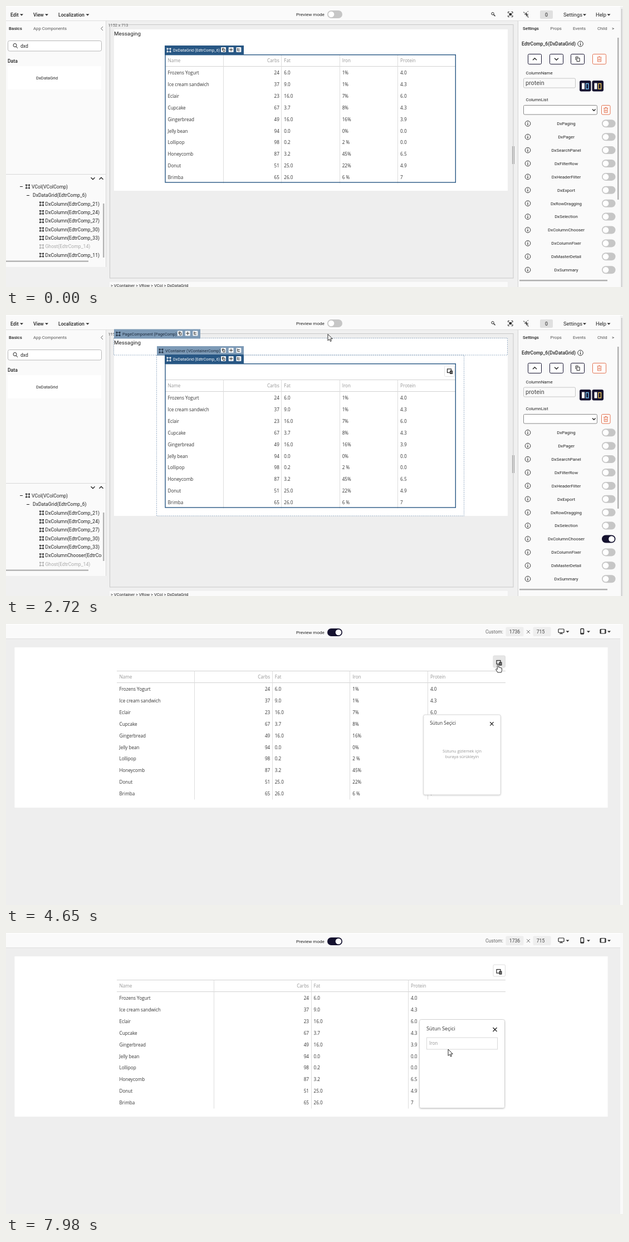
An HTML page for the animation above (8000 ms loop, 1108 by 505 pixels).

```html
<!DOCTYPE html>
<html lang="en">
<head>
<meta charset="utf-8">
<style>
html, body { margin: 0; width: 100%; height: 100%; overflow: hidden; background: #eee }
svg { display: block; width: 1108px; height: 505px; font-family: Roboto, sans-serif; fill: #222 }
.grid { font-family: "Open Sans", sans-serif; fill: #333 }
.mute { fill: #959595 }
.line { fill: none; stroke: #222 }
.bold { font-weight: 500 }
</style>
</head>
<body>
<svg id="stage" viewBox="0 0 1108 505"></svg>
<script>
const NAVY = '#15122f', BLUE = '#285784', PALE = '#7d9ab6', RED = '#e2714f';

// Markup helpers; text is placed by its vertical middle.
const text = (x, y, s, size = 8.7, attrs = '') =>
  `<text x="${x}" y="${y + size * 0.36}" font-size="${size}" ${attrs}>${s}</text>`;
const rect = (x, y, w, h, fill, attrs = '') =>
  `<rect x="${x}" y="${y}" width="${w}" height="${h}" fill="${fill}" ${attrs}/>`;
const path = (d, attrs = '') => `<path class="line" d="${d}" ${attrs}/>`;
const at = (x, y, body) => `<g transform="translate(${x} ${y})">${body}</g>`;
const group = (id, body, attrs = '') => `<g id="${id}" ${attrs}>${body}</g>`;
const MID = 'text-anchor="middle"', END = 'text-anchor="end"', BOLD = 'class="bold"';

const caret = (x, y) => `<path d="M${x - 3} ${y - 1.5}h6l-3 3z"/>`;
const chevron = (x, y, up) => path(`M${x - 3.5} ${y + up * 1.7}l3.5 ${-up * 3.5}l3.5 ${up * 3.5}`, 'stroke-width="1.3"');
const toggle = (id, x, y, w) =>
  rect(x, y - 7, w, 14, '#c6c6c6', `rx="7" id="${id}Track"`) +
  `<circle id="${id}Knob" cx="${x + 7}" cy="${y}" r="5.3" fill="#fff"/>`;
const info = (x, y) => `<circle class="line" cx="${x}" cy="${y}" r="4.8" stroke-width=".9"/>` +
  path(`M${x} ${y - 2.8}v1.2M${x} ${y - .6}v3.4`, 'stroke-width="1.2"');
const nodeIcon = (x, y, color = '#222') => {
  const corner = (dx, dy) => rect(x + dx - 1.1, y + dy - 1.1, 2.2, 2.2, color);
  return rect(x - 2.6, y - 2.6, 5.2, 5.2, 'none', `stroke="${color}" stroke-width=".9"`) +
    corner(-2.8, -2.8) + corner(2.8, -2.8) + corner(-2.8, 2.8) + corner(2.8, 2.8);
};
const copyIcon = (x, y) => at(x, y, path('M-3.4 1.5V-4H1.4M-1.4-1.9H3.6V4.2H-1.4Z'));
const trash = (x, y) => at(x, y,
  path('M-4-3.5H4M-1.3-4.7H1.3M-3-3V4.5H3V-3M-1-1V2.7M1-1V2.7', `style="stroke:${RED}"`));
const chooserIcon = (x, y) =>
  rect(x - 4.5, y - 4, 7, 6.5, 'none', 'stroke="#222" stroke-width="1.2"') +
  rect(x, y - 1, 5, 6, '#222') + path(`M${x + 1} ${y + 1}h3m-3 2h3`, 'style="stroke:#fff" stroke-width=".7"');

// Name tag of a component on the design surface.
function tag(x, y, w, label, solid) {
  const ink = solid ? '#fff' : '#1c2a3c';
  const tools = ['M-2 1V-2.5H1M-.7-1H2.4V3H-.7Z', 'M0-3V3M-3 0H3', 'M-2-3V2H2M-2-1H2'];
  return rect(x, y, w, 17, solid ? BLUE : PALE) + nodeIcon(x + 7.5, y + 8.5, ink) +
    text(x + 15, y + 8.5, label, 7.35, `fill="${ink}"`) +
    tools.map((d, i) => at(x + w - 36.5 + i * 13.7, y + 7.5,
      rect(-4.5, -4.5, 9, 9, '#f2f4f6', 'rx="1"') + path(d, 'stroke-width=".9"'))).join('');
}
const dashed = (x, y, w, h, id = '') =>
  rect(x, y, w, h, 'none', `stroke="${PALE}" stroke-dasharray="2 1.5" stroke-width=".8" id="${id}"`);

const HEADS = ['Name', 'Carbs', 'Fat', 'Iron', 'Protein'];
const ROWS = `Frozens Yogurt,24,6.0,1%,4.0
Ice cream sandwich,37,9.0,1%,4.3
Eclair,23,16.0,7%,6.0
Cupcake,67,3.7,8%,4.3
Gingerbread,49,16.0,16%,3.9
Jelly bean,94,0.0,0%,0.0
Lollipop,98,0.2,2 %,0.0
Honeycomb,87,3.2,45%,6.5
Donut,51,25.0,22%,4.9
Brimba,65,26.0,6 %,7`.split('\n').map(r => r.split(','));

function grid(x, y, width, columns) {
  const w = width / columns.length;
  let out = path(`M${x} ${y}h${width}M${x} ${y + 21}h${width}`, 'style="stroke:#d2d2d2"');
  columns.forEach((c, i) => {
    const right = c === 1, tx = right ? x + (i + 1) * w - 4 : x + i * w + 4.5;
    const anchor = right ? END : '';
    if (i) out += path(`M${Math.floor(x + i * w) + .5} ${y}v231`, 'style="stroke:#ddd"');
    out += text(tx, y + 11, HEADS[c], 8.15, anchor + ' class="mute"');
    ROWS.forEach((r, n) => out += text(tx, y + 33 + n * 20.83, r[c], 8.15, anchor));
  });
  return `<g class="grid">${out}</g>`;
}

function treeRows(names) {
  return names.map((s, i) => {
    const y = 355.5 + i * 15.35, color = s.startsWith('Ghost') ? '#aaa' : '#222';
    return nodeIcon(64, y, color) + text(70.5, y, s, 8.65, `fill="${color}"`);
  }).join('');
}
const column = n => `DxColumn(EdtrComp_${n})`;
const firstColumns = [21, 24, 27, 30, 33].map(column);

const OPTIONS = ['Paging', 'Pager', 'SearchPanel', 'FilterRow', 'HeaderFilter', 'Export', 'RowDragging',
  'Selection', 'ColumnChooser', 'ColumnFixer', 'MasterDetail', 'Summary'];

const leftPanel =
  rect(0, 27, 180, 442, '#fafafa') + path('M179.5 27V469M0 302.5H180', 'style="stroke:#d8d8d8"') +
  text(5, 40, 'Basics', 8, BOLD) + text(49, 40, 'App Components', 7.75, 'fill="#555"') +
  path('M174 37l-3.5 3.5l3.5 3.5', 'style="stroke:#666"') +
  rect(3.5, 62.5, 168, 18.5, '#fff', 'stroke="#b8b8b8" rx="3"') +
  `<circle class="line" cx="16" cy="70.5" r="3"/>` + path('M18 73l3 3') + text(26, 71.5, 'dxd', 8.6) +
  text(3, 99, 'Data', 8.6, BOLD) + rect(3, 108, 168, 42, '#fff') + text(73.5, 129, 'DxDataGrid', 7.75, MID) +
  chevron(156, 310, -1) + chevron(171, 310, 1) +
  path('M25 324.5h5M37 340.5h5') + nodeIcon(39, 324.5) +
  text(46, 324.5, 'VCol(VColComp)', 8.65) + text(48, 340, 'DxDataGrid(EdtrComp_6)', 8.65) +
  `<g clip-path="url(#treeClip)">` +
  group('treeBefore', treeRows([...firstColumns, 'Ghost(EdtrComp_14)', column(11)])) +
  group('treeAfter', treeRows([...firstColumns, 'DxColumnChooser(EdtrComp_15)', 'Ghost(EdtrComp_14)'])) + '</g>' +
  rect(174, 355, 2.5, 97, '#b5b5b5', 'id="treeBar"') + rect(0, 457.5, 148, 2.5, '#b5b5b5');

const columnButton = (x, accent) => rect(x, 134, 20.5, 19.5, NAVY, 'rx="3"') +
  rect(x + 4, 138.5, 5, 11, '#fff') + rect(x + 11.5, 139.5, 4.5, 9.5, 'none', `stroke="${accent}" stroke-width="1.3"`);

const rightPanel =
  rect(919, 27, 184, 478, '#fafafa') + path('M919.5 27V505', 'style="stroke:#d4d4d4"') +
  text(928, 40, 'Settings', 7.8, BOLD) +
  text(977.5, 40, 'Props', 7.8, 'fill="#555"') + text(1018, 40, 'Events', 7.8, 'fill="#555"') +
  text(1062, 40, 'Child', 7.8, 'fill="#555"') + text(1088, 40, '&gt;', 8) +
  text(926, 68, 'EdtrComp_6(DxDataGrid)', 8.65, BOLD) + info(1031.5, 68) +
  [937.5, 976.5, 1014.5, 1053.5].map((x, i) =>
    rect(x, 86.5, 24, 18, '#fff', `rx="2" stroke="${i < 3 ? NAVY : RED}"`)).join('') +
  chevron(949.5, 95.5, 1) + chevron(988.5, 95.5, -1) + copyIcon(1026.5, 95.5) + trash(1065.5, 95.5) +
  text(933.5, 120, 'ColumnName', 7.9) +
  rect(929.5, 130, 93, 17, '#fafafa', 'stroke="#c4c4c4" rx="2"') + text(933, 138.5, 'protein', 10.8, 'fill="#444"') +
  columnButton(1030, '#7fd0ff') + columnButton(1052.5, '#ffd35a') +
  text(933.5, 168, 'ColumnList', 7.9) +
  rect(929.5, 178.5, 132, 16.5, '#fff', 'stroke="#888" rx="2"') + path('M1053 185.5l2.8 2.8l2.8-2.8', 'stroke-width="1.4"') +
  rect(1069.5, 178.5, 15.5, 16.5, '#fff', `stroke="${RED}" rx="2"`) + trash(1077.2, 187) +
  OPTIONS.map((s, i) => {
    const y = 211.3 + i * 23.9;
    return info(937, y) + text(1006, y, 'Dx' + s, 7.93, MID) + toggle(s, 1070, y, 24.5);
  }).join('') +
  rect(1098, 57, 2.5, 291, '#b0b0b0') + rect(922, 492, 158, 2.5, '#b0b0b0') + rect(1105, 5, 1.5, 500, '#c4c4c4');

const canvas =
  rect(186.5, 33.5, 724.5, 455.5, '#eee', 'stroke="#c8c8c8"') + rect(186, 496, 715, 9, '#fafafa') +
  text(183.5, 34, '1152 x 713', 7.3, 'fill="#666"') +
  text(188, 502, '&gt; VContainer &gt; VRow &gt; VCol &gt; DxDataGrid', 7.55) +
  rect(194, 42, 707, 290, '#fff', 'id="page"') + text(194, 49, 'Messaging', 9.8) +
  path('M909.5 252v32M912.5 252v32', 'style="stroke:#999"') +
  group('pageHover', dashed(193.5, 41.5, 707, 30.5) + tag(194, 25.5, 155, 'PageComponent (PageComp)')) +
  group('containerHover', dashed(270.5, 72, 552, 260, 'containerBox') + tag(271, 56, 156, 'VContainer (VContainerComp)')) +
  group('colHover', dashed(278.5, 80, 537, 245) + tag(278, 64, 115, 'VCol (VColComp)')) +
  group('editGrid', grid(286, 87.5, 522, [0, 1, 2, 3, 4])) +
  group('editChooser', rect(787.5, 91.5, 18, 19, '#fff', 'stroke="#e4e4e4" rx="2"') + chooserIcon(797, 101)) +
  rect(286, 87.7, 521.3, 229.3, 'none', `stroke="${BLUE}" stroke-width="1.4" id="gridFrame"`) +
  tag(285, 71, 142, 'DxDataGrid (EdtrComp_6)', true);

const editorBar =
  text(8, 15.5, 'Edit', 8.6, BOLD) + caret(28, 16) + text(49, 15.5, 'View', 8.6, BOLD) + caret(73, 16) +
  text(94, 15.5, 'Localization', 8.6, BOLD) + caret(146.5, 16) +
  `<circle class="line" cx="874" cy="13.8" r="2.2"/>` + path('M875.7 15.5l2.8 2.8', 'stroke-width="1.3"') +
  path('M901.5 13v-2.5h2.5M907.5 10.5h2.5v2.5M910 17v2.5h-2.5M904 19.5h-2.5v-2.5M902.5 12.5l7 5M909.5 12.5l-7 5', 'stroke-width=".9"') +
  `<circle cx="905.8" cy="15" r="2.2"/>` +
  path('M931 15h7M934.5 11.5v7M931.5 12l6 6M930 12.5v-2M936.5 10.5l1.5-1M936 17l2 4') +
  rect(959, 8, 23, 15, '#e0e0e0', 'rx="2"') + text(970.5, 15.5, '0', 8.8, MID) +
  text(1001, 15.5, 'Settings', 9.3) + caret(1039, 16) + text(1059, 15.5, 'Help', 9.3) + caret(1082.5, 16);

const previewBar =
  text(861, 14, 'Custom:', 8.57, 'fill="#666"') + rect(897.5, 5.5, 32, 16.5, '#eee', 'rx="2"') +
  rect(946.5, 5.5, 32, 16.5, '#eee', 'rx="2"') + path('M935 11l6 6M941 11l-6 6', 'style="stroke:#777"') +
  group('sizes', text(913.5, 14, 1736, 8.6, MID) + text(960, 14, 715, 8.6, MID), 'fill="#444"') +
  rect(992, 9, 10, 6.5, 'none', 'stroke="#222" stroke-width="1.2" rx="1"') + path('M997 15.5v2M994 17.5h6', 'stroke-width="1.2"') + caret(1008.5, 14) +
  rect(1032, 8.5, 5.5, 9.5, 'none', 'stroke="#222" stroke-width="1.3" rx="1"') + path('M1032 16.5h5.5') + caret(1046, 14) +
  rect(1067, 9.5, 10, 7.5, 'none', 'stroke="#222" stroke-width="1.2" rx="1"') + path('M1068 10v7M1076 10v7', 'stroke-width="1.5"') + caret(1083, 14);

const popup =
  rect(742.5, 155.5, 153, 159, '#fff', 'stroke="#d4d4d4" rx="3" filter="url(#shadow)"') +
  text(755, 171.5, 'Sütun Seçici', 9.3) + path('M874.5 170l7 7M881.5 170l-7 7', 'stroke-width="1.3"') +
  group('hint', text(819, 227.5, 'Sütunu gizlemek için', 8.1, MID) + text(819, 239, 'buraya sürükleyin', 8.1, MID), 'class="mute"') +
  group('chip', rect(755.5, 188, 127, 21, '#fff', 'stroke="#d8d8d8"') + text(760, 198.5, 'Iron', 8.15, 'class="mute"'));

const preview =
  rect(0, 27, 1103, 478, '#eee') + rect(1103, 0, 5, 505, '#f9f9f9') + rect(15.5, 42, 1065, 288, '#fff') + previewBar +
  rect(875, 57, 21.5, 21, '#fff', 'stroke="#ddd" rx="2" id="chooserButton"') + chooserIcon(885.5, 69.5) +
  group('grid5', grid(199, 84.5, 698, [0, 1, 2, 3, 4])) + group('grid4', grid(199, 84.5, 698, [0, 1, 2, 4])) +
  group('popup', popup, 'class="grid"') +
  group('dragged', rect(0, 0, 139, 21, '#fff', 'stroke="#d8d8d8" filter="url(#shadow)"') + text(4.5, 11, 'Iron', 8.15, 'class="mute"'), 'class="grid"') +
  group('status', rect(0, 494.5, 8, 10.5, '#333') + text(0, 500, '//', 8, 'fill="#fff"'));

const $ = id => document.getElementById(id);
$('stage').innerHTML =
  `<defs><clipPath id="treeClip"><path d="M0 303h172v152h-172z"/></clipPath>
  <filter id="shadow" x="-10%" y="-20%" width="120%" height="150%"><feDropShadow dx="0" dy="1" stdDeviation="1.2" flood-opacity=".22"/></filter></defs>` +
  rect(0, 0, 1108, 505, '#f0f0f0') + rect(0, 1, 1103, 25, '#fafafa') +
  path('M0 26.5H1103', 'style="stroke:#dedede"') + path('M0 .5H1108', 'style="stroke:#fff"') +
  group('editor', leftPanel + canvas + rightPanel + editorBar) + group('preview', preview) +
  text(521, 15.5, 'Preview mode', 8.1) + toggle('preview', 577, 15, 27) +
  group('cursor',
    '<path id="arrow" d="M0 0V11.5L2.7 9L4.5 13L6.3 12.2L4.6 8.3H8.2Z"/>' +
    '<path id="hand" d="M-1.2 1.2Q0-.6 1.2 1.2V5Q2.5 4.2 3.3 5.4Q4.6 4.7 5.3 6Q6.8 5.6 7 7V10.5L5.8 14H-.6L-4 8.6Q-3.6 6.6-1.2 8.6Z"/>',
    'fill="#fff" stroke="#111" stroke-width=".9"');

// Pointer route: time, x, y.
const ROUTE = [[130, 942, 446], [400, 819, 300], [540, 812, 270], [1080, 930.5, 322.5], [1280, 1010, 381],
  [1350, 1013, 383], [1770, 1079, 402], [2100, 1079, 402], [2720, 578, 34.5], [2860, 586, 15.5], [3750, 586, 15.5],
  [4510, 883.5, 73], [4650, 883.5, 73], [5350, 824, 176], [5420, 822, 174], [6180, 725, 142], [6260, 718, 138],
  [6540, 664, 94], [6680, 655, 94], [6930, 752, 285], [7030, 752, 250], [7300, 795, 214], [7700, 795, 214], [7800, 794, 209]];
const clamp = v => Math.max(0, Math.min(1, v));

function pointer(t) {
  const i = ROUTE.findIndex(p => p[0] > t);
  if (i < 1) return (i ? ROUTE.at(-1) : ROUTE[0]).slice(1);
  const [a, b] = [ROUTE[i - 1], ROUTE[i]];
  const u = (t - a[0]) / (b[0] - a[0]), k = u * u * (3 - 2 * u);
  return [a[1] + (b[1] - a[1]) * k, a[2] + (b[2] - a[2]) * k];
}
const show = (id, on) => $(id).style.display = on ? '' : 'none';
const set = (id, name, value) => $(id).setAttribute(name, value);
const move = (id, x, y) => set(id, 'transform', `translate(${x} ${y})`);

function setToggle(id, x, travel, k) {
  const mix = (from, to) => Math.round(from + (to - from) * k);
  set(id + 'Knob', 'cx', x + travel * k);
  set(id + 'Track', 'fill', `rgb(${mix(198, 21)},${mix(198, 18)},${mix(198, 47)})`);
}

function draw(t) {
  const between = (a, b) => t >= a && t < b;
  const [x, y] = pointer(t);
  const added = t >= 2170, previewing = t >= 3400, dropped = t >= 7100, drop = added ? 29 : 0;

  show('editor', !previewing);
  show('preview', previewing);
  show('treeBefore', !added);
  show('treeAfter', added);
  set('treeBar', 'height', added ? 87 : 97);
  set('page', 'height', 290 + drop);
  set('gridFrame', 'height', 229.3 + drop);
  set('containerBox', 'height', 260 + drop);
  move('editGrid', 0, drop);
  show('editChooser', added);
  show('containerHover', between(200, 600) || t >= 2430);
  show('colHover', between(600, 2430));
  show('pageHover', t >= 2600);
  setToggle('ColumnChooser', 1077, 10.5, clamp((t - 2100) / 180));
  setToggle('preview', 584, 13, clamp((t - 3410) / 200));

  show('sizes', t >= 3600);
  show('status', t < 3750);
  set('chooserButton', 'fill', between(4440, 4800) ? '#e6e6e6' : '#fff');
  show('popup', t >= 4560);
  const scale = 1 - 0.45 * (1 - clamp((t - 4510) / 350)) ** 3;
  set('popup', 'transform', `translate(819 235) scale(${scale}) translate(-819 -235)`);
  show('grid5', !dropped);
  show('grid4', dropped);
  show('hint', !dropped);
  show('chip', dropped);
  show('dragged', between(6690, 7100));
  move('dragged', x - 37, y - 10);

  const hand = between(1700, 2170) || between(2830, 3820) || between(4440, 4750) || between(6400, 7710);
  show('cursor', t >= 130);
  show('hand', hand);
  show('arrow', !hand);
  move('cursor', x, y);
}

function frame() {
  draw(performance.now() % 8000);
  requestAnimationFrame(frame);
}
frame();
</script>
</body>
</html>
```
